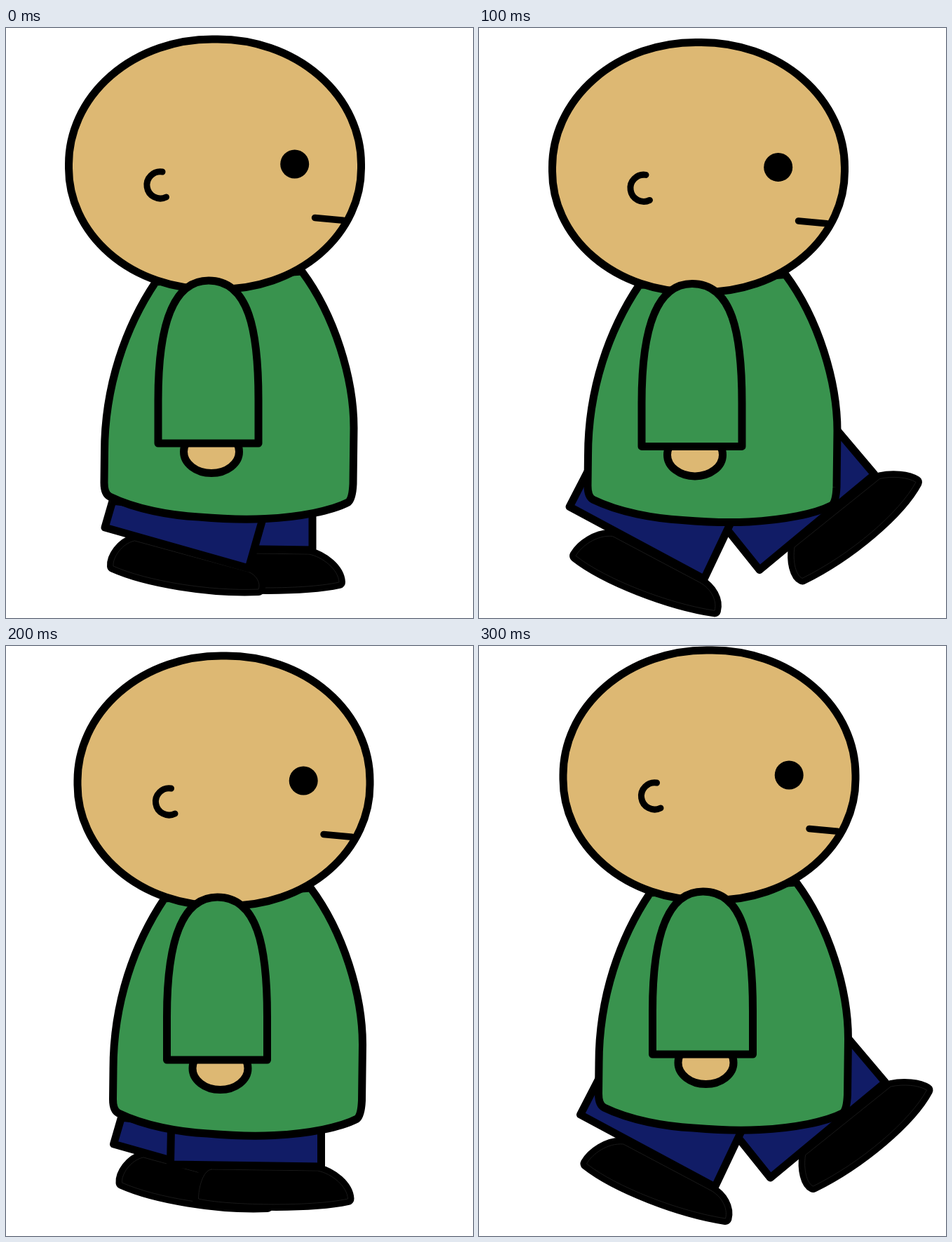
These frames come from a looping animation (666 px wide and 841 px high, 0.4 s). An HTML page with a canvas:

```html
<!DOCTYPE html>
<html lang="en">
<head>
<meta charset="utf-8">
<title>Walk cycle</title>
<style>
html, body { margin: 0; width: 100%; height: 100%; overflow: hidden; background: #fff; }
canvas { display: block; }
</style>
</head>
<body>
<canvas id="stage" width="666" height="841"></canvas>
<script>
const ctx = document.getElementById('stage').getContext('2d');
const SKIN = '#ddb873', GREEN = '#39934e', BLUE = '#111c66', LINE = 11;
const STEP = 100;

const shapes = {
  head: 'M294 16H302A204.5 178 0 0 1 506.5 194V200A199.5 172 0 0 1 307 372H289A199.5 172 0 0 1 89.5 200V194A204.5 178 0 0 1 294 16Z',
  body: 'M213.5 362C171 425 140.5 510 140.5 605L140 648Q140 664 148 668C185 686 235 695 275 697C310 700 350 700.5 370 699.5C420 697 465 688 488 676Q494 671 495 650L496 570C496 500 469 410 422 347Z',
  arm: 'M217 592V530C217 440 232 360 289 360C346 360 360 430 360 530V592Z',
  hand: 'M253.5 604A39.5 30.5 0 0 0 332.5 604A39.5 30.5 0 0 0 253.5 604Z',
  ear: 'M223 205A19.1 19.1 0 1 0 228.5 241',
  mouth: 'M440.5 270.5L481 274.3'
};
for (const k in shapes) shapes[k] = new Path2D(shapes[k]);

const leg = (pants, shoe) => ({ pants: new Path2D(pants), shoe: new Path2D(shoe) });

const tilted = leg('M152 674L141 712L346 770L366 700Z',
  'M183 731C165 735 152 755 153 767C200 788 290 803 360 800C364 790 355 778 345 775Z');
const flat = leg('M223 690L222 741L437 744V690Z',
  'M280 748L432 750C452 754 474 772 475 790C420 802 300 799 262 790C262 775 268 750 280 748Z');
const back = leg('M114 678L146 616L352 684L306 781Z',
  'M175 720C153 718 131 734 123 748C165 781 255 816 321 826C325 811 315 794 300 786Z');
const front = leg('M483 554L549 632L385 768L324 692Z',
  'M557 638C575 634 597 636 608 643C585 686 515 746 446 780C437 776 432 756 435 736Z');

// Body offset and legs, rearmost first
const poses = [
  { x: 0, y: 0, legs: [flat, tilted] },
  { x: 15, y: 4.4, legs: [front, back] },
  { x: 12.5, y: -2, legs: [tilted, flat] },
  { x: 30.5, y: -10, legs: [front, back] }
];

function stroke(path, width = LINE, color = '#000') {
  ctx.lineWidth = width;
  ctx.strokeStyle = color;
  ctx.stroke(path);
}

function fill(path, color) {
  ctx.fillStyle = color;
  ctx.fill(path);
}

function outlined(path, color) {
  fill(path, color);
  stroke(path);
}

function drawLeg({ pants, shoe }) {
  fill(shoe, '#000');
  stroke(shoe, 18);
  stroke(shoe, 0.8, '#202020');
  outlined(pants, BLUE);
}

function draw({ x, y, legs }) {
  ctx.setTransform(1, 0, 0, 1, 0, 0);
  ctx.fillStyle = '#fff';
  ctx.fillRect(0, 0, 666, 841);
  ctx.translate(x, y);
  ctx.lineCap = ctx.lineJoin = 'round';
  legs.forEach(drawLeg);
  outlined(shapes.body, GREEN);
  outlined(shapes.head, SKIN);
  outlined(shapes.hand, SKIN);
  outlined(shapes.arm, GREEN);
  stroke(shapes.ear, 9);
  stroke(shapes.mouth, 9.5);
  ctx.beginPath();
  ctx.arc(411.7, 194, 20.5, 0, Math.PI * 2);
  ctx.fillStyle = '#000';
  ctx.fill();
}

const start = performance.now();
function tick() {
  const t = performance.now() - start;
  draw(poses[Math.floor(t / STEP) % poses.length]);
  requestAnimationFrame(tick);
}
tick();
</script>
</body>
</html>
```
